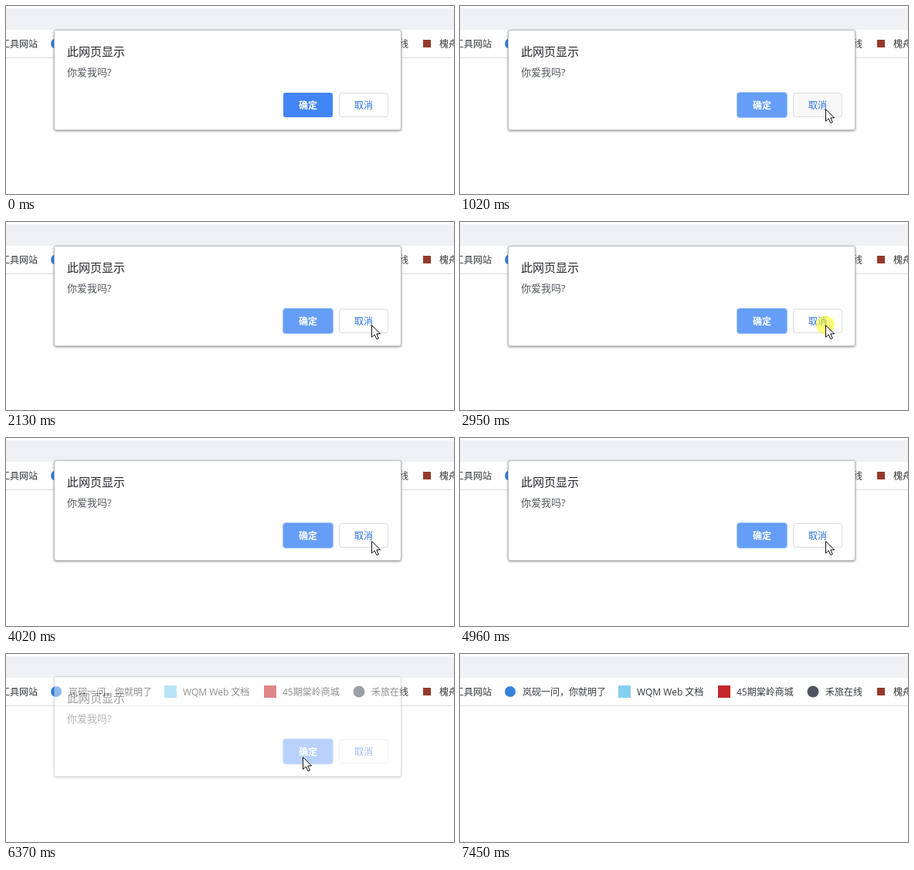
Recreate the animation shown at these times as an HTML page. Size 580x245 px, loop 7550 ms.

```html
<!DOCTYPE html>
<html lang="zh-CN">
<head>
<meta charset="utf-8">
<title>确认对话框</title>
<style>
html, body { margin: 0; width: 100%; height: 100%; overflow: hidden; background: #fff; }
svg { display: block; width: 580px; height: 245px; }
text { font: 12px "Open Sans", "Noto Sans CJK SC", "Noto Sans CJK", sans-serif; fill: #36393d; white-space: pre; }
.title { font-size: 15px; fill: #25272c; }
.body { font-size: 13px; fill: #55595e; }
.ok { font-weight: 700; fill: #fff; }
.cancel { fill: #2a72de; }
#panel { filter: drop-shadow(0 1.5px 1.8px rgba(0,0,0,.42)); }
</style>
</head>
<body>
<svg viewBox="0 0 580 245">
  <rect width="580" height="245" fill="#fff"/>
  <rect y="3" width="580" height="28" fill="#f0f1f5"/>
  <rect y="67" width="580" height="1" fill="#dadce0"/>

  <g id="bookmarks">
    <text x="-7" y="53.5">工具网站</text>
    <circle cx="65" cy="49" r="7" fill="#3482dc"/>
    <text x="81" y="53.5">岚砚一问，你就明了</text>
    <rect x="205" y="41" width="16" height="16" fill="#83d0f2"/>
    <text x="229" y="53.5">WQM Web 文档</text>
    <rect x="334" y="41" width="16" height="16" fill="#c5282d"/>
    <text x="358" y="53.5">45期棠岭商城</text>
    <circle cx="457" cy="49" r="7.5" fill="#4d5560"/>
    <text x="473" y="53.5">禾旅在线</text>
    <rect x="540" y="44" width="10" height="10" fill="#943a2c"/>
    <text x="561" y="53.5">槐舟</text>
  </g>

  <g id="dialog">
    <rect id="panel" x="62.5" y="31.5" width="449" height="130" rx="2.5" fill="#fff" stroke="#bcbdc2"/>
    <text class="title" x="79" y="65">此网页显示</text>
    <text class="body" x="79" y="91">你爱我吗?</text>
    <rect id="ring" x="358.5" y="112.5" width="65" height="33" rx="3" fill="none" stroke="#a6c6fa"/>
    <rect id="ok" x="359" y="113" width="64" height="32" rx="3"/>
    <text class="ok" x="379" y="134">确定</text>
    <rect id="cancel" x="431.5" y="113.5" width="63" height="31" rx="3.5" stroke="#dadce0"/>
    <text class="cancel" x="451" y="134">取消</text>
  </g>

  <circle id="glow" r="12" fill="#ff0" fill-opacity=".52"/>
  <path id="cursor" d="M.5 .5V16.2L4.2 12.8L6.9 18.6L9.3 17.5L6.7 11.8H11.6Z" fill="#fff" stroke="#111" stroke-width="1"/>
</svg>

<script>
const LOOP = 7550;
const $ = id => document.getElementById(id);
const [dialog, ok, ring, cancel, glow, cursor] =
  ['dialog', 'ok', 'ring', 'cancel', 'glow', 'cursor'].map($);

// pointer moves: start, step length, steps, from, to, sag
const moves = [
  { at: 300, step: 65, n: 12, from: [510, 250], to: [473, 134], sag: 0 },
  { at: 5590, step: 62, n: 6, from: [472, 134], to: [384, 134], sag: 4 },
  { at: 7050, step: 66, n: 7, from: [384, 134], to: [482, 248], sag: 0 }
];
// cancel clicks: press time, moment the new dialog is ready
const clicks = [[1070, 1320], [1880, 2270], [2950, 3270], [3880, 4280], [4840, 5210]];
const drop = [0, -7, -2, -1];
const fadeIn = [1, .6];
const OK_PRESS = 6090, CLOSE = 6300, CLOSED = 6490;

function pointer(t) {
  const m = moves.filter(m => t >= m.at).pop();
  if (!m) return [0, 300];
  const k = Math.min(m.n, Math.floor((t - m.at) / m.step) + 1);
  const p = k / m.n;
  const mix = i => m.from[i] + (m.to[i] - m.from[i]) * p;
  return [Math.round(mix(0)), Math.round(mix(1) + m.sag * Math.sin(Math.PI * p))];
}

function pose(t) {
  const s = { y: 0, alpha: 1, glow: false, live: true };
  const click = clicks.find(([a, b]) => t >= a && t < b);
  if (click) {
    const k = Math.floor((t - click[0]) / 60);
    s.y = drop[k] ?? 0;
    s.alpha = fadeIn[k] ?? 1;
    s.glow = k === 0;
    s.live = false;
  } else if (t >= CLOSED) {
    s.alpha = 0;
  } else if (t >= CLOSE) {
    const k = Math.floor((t - CLOSE) / 63) + 1;
    s.y = -k;
    s.alpha = 1 - k * .28;
  } else if (t >= OK_PRESS) {
    s.glow = true;
  }
  return s;
}

const inside = (x, y, left) => x >= left && x <= left + 64 && y >= 113 && y <= 145;

function draw(t) {
  const [x, y] = pointer(t);
  const s = pose(t);
  const focused = t >= 540;
  dialog.setAttribute('transform', `translate(0 ${s.y})`);
  dialog.setAttribute('opacity', s.alpha);
  ok.setAttribute('fill', !focused ? '#4285f4' : s.live && inside(x, y, 359) ? '#629af6' : '#669df6');
  ring.setAttribute('visibility', focused ? 'visible' : 'hidden');
  cancel.setAttribute('fill', s.live && inside(x, y, 431) ? '#f8f8f9' : '#fff');
  glow.setAttribute('transform', `translate(${x} ${y})`);
  glow.setAttribute('visibility', s.glow ? 'visible' : 'hidden');
  cursor.setAttribute('transform', `translate(${x} ${y})`);
}

const start = performance.now();
function tick() {
  draw((performance.now() - start) % LOOP);
  requestAnimationFrame(tick);
}
tick();
</script>
</body>
</html>
```
